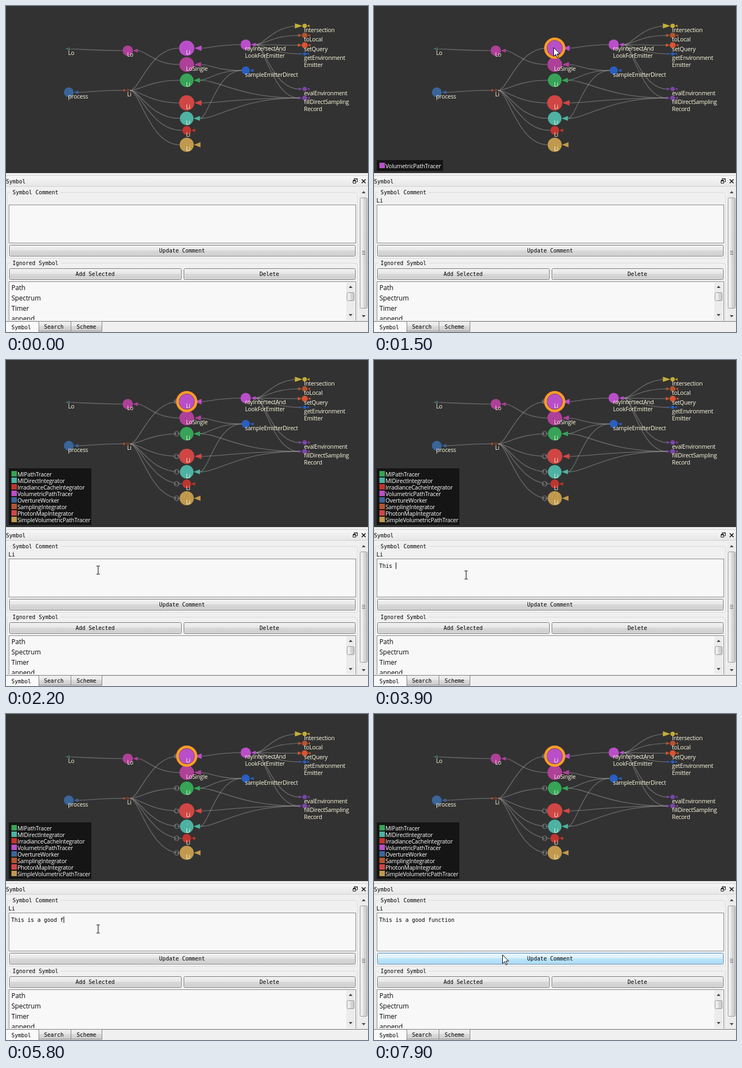
Animation, 666 px wide and 599 px high, one loop 8 s. Source, as an HTML page:

```html
<!DOCTYPE html>
<html lang="en">
<head>
<meta charset="utf-8">
<title>Symbol comment</title>
<style>
html, body { margin: 0; width: 100%; height: 100%; overflow: hidden; background: #f0f0f0; }
svg { display: block; width: 666px; height: 599px; }
text { white-space: pre; }
.tag { font: 10.6px "Open Sans", "Noto Sans", sans-serif; letter-spacing: -.22px; fill: #fffce0; }
.key { fill: #fff; }
.ui { font: 10px "DejaVu Sans Mono", "Liberation Mono", monospace; fill: #000; }
.item { font: 12px "Open Sans", "Noto Sans", sans-serif; fill: #000; }
.badge { font: bold 8px "DejaVu Sans", sans-serif; fill: #1c1c1c; text-anchor: middle; }
.mid { text-anchor: middle; }
</style>
</head>
<body>
<svg id="stage" viewBox="0 0 666 599" xmlns="http://www.w3.org/2000/svg">
  <defs>
    <linearGradient id="face" x2="0" y2="1">
      <stop offset="0" stop-color="#f2f2f2"/><stop offset=".48" stop-color="#e6e6e6"/>
      <stop offset=".5" stop-color="#d9d9d9"/><stop offset="1" stop-color="#cdcdcd"/>
    </linearGradient>
    <linearGradient id="hot" x2="0" y2="1">
      <stop offset="0" stop-color="#eaf6fd"/><stop offset=".48" stop-color="#d9f0fc"/>
      <stop offset=".5" stop-color="#bee6fd"/><stop offset="1" stop-color="#a7d9f5"/>
    </linearGradient>
    <linearGradient id="thumb">
      <stop offset="0" stop-color="#f3f3f3"/><stop offset=".48" stop-color="#e6e6e6"/>
      <stop offset=".52" stop-color="#d6d6d6"/><stop offset="1" stop-color="#c9c9c9"/>
    </linearGradient>
    <linearGradient id="title" x2="0" y2="1">
      <stop offset="0" stop-color="#f7f7f7"/><stop offset="1" stop-color="#e6e6e6"/>
    </linearGradient>
    <clipPath id="listClip"><rect x="6" y="507" width="637" height="70"/></clipPath>
  </defs>
</svg>
<script>
const svg = document.getElementById('stage');

function el(parent, name, attrs, content) {
  const e = document.createElementNS('http://www.w3.org/2000/svg', name);
  for (const k in attrs) e.setAttribute(k, attrs[k]);
  if (content !== undefined) e.textContent = content;
  parent.appendChild(e);
  return e;
}
const group = (parent = svg) => el(parent, 'g', {});
const rect = (p, x, y, width, height, fill, more) => el(p, 'rect', { x, y, width, height, fill, ...more });
const disc = (p, cx, cy, r, fill, more) => el(p, 'circle', { cx, cy, r, fill, ...more });
const text = (p, x, y, cls, s) => el(p, 'text', { x, y, class: cls }, s);
const path = (p, d, more) => el(p, 'path', { d, fill: 'none', ...more });
const show = (e, on) => e.setAttribute('visibility', on ? 'visible' : 'hidden');
const move = (e, x, y) => e.setAttribute('transform', `translate(${x} ${y})`);

const C = {
  green: '#36a457', teal: '#4eb2a2', red: '#c0352f', violet: '#b94fc8', blue: '#3a6599',
  rust: '#b3552f', coral: '#cf4645', gold: '#c0994d', pink: '#ae4098', azure: '#2a5ec0',
  yellow: '#c5ae36', orange: '#d95433', purple: '#7b46a6'
};

// ---- call graph, laid out in evenly spaced columns ----
const BACK = '#323232';
rect(svg, 0, 0, 666, 307, BACK);
const graph = group();
const [edges, badges, nodes, rings, labels] = Array.from({ length: 5 }, () => group(graph));

// id: column, y, radius, colour, label, badge
const N = {
  lo: [0, 79, 2, 'teal', 'Lo'],
  process: [0, 158.5, 9, 'blue', 'process'],
  lo2: [1, 82, 9.5, 'pink', 'Lo'],
  li: [1, 155, 2, 'rust', 'Li'],
  single: [2, 107.5, 13.5, 'pink', 'LoSingle'],
  volume: [2, 77.5, 14, 'violet', 'Li', 1],
  path: [2, 136.5, 12.5, 'green', 'Li', 3],
  photon: [2, 178, 14, 'coral', 'Li', 6],
  direct: [2, 206.5, 12.5, 'teal', 'Li', 4],
  cache: [2, 228.5, 8, 'red', 'Li', 5],
  simple: [2, 255, 13, 'gold', 'Li', 2],
  ray: [3, 71, 9.5, 'violet', 'rayIntersectAnd\nLookForEmitter'],
  sample: [3, 118.5, 7.5, 'azure', 'sampleEmitterDirect'],
  hit: [4, 36.5, 4, 'yellow', 'Intersection'],
  local: [4, 54, 5, 'rust', 'toLocal'],
  query: [4, 72, 5.5, 'orange', 'setQuery'],
  env: [4, 88, 3, 'azure', 'getEnvironment\nEmitter'],
  evalEnv: [4, 152.5, 4, 'purple', 'evalEnvironment'],
  fill: [4, 169, 4.5, 'purple', 'fillDirectSampling\nRecord']
};
const links = {
  lo: 'lo2', process: 'li', lo2: 'single', li: 'volume path photon direct cache simple',
  volume: 'ray', single: 'sample', path: 'sample fill', photon: 'fill', direct: 'sample fill',
  ray: 'hit local query env evalEnv fill'
};
const colX = c => 115.5 + 108.5 * c;

// Triangle with its tip at x, base at x + w
const arrow = (x, y, w, h, fill) => path(nodes, `M${x} ${y}l${w} ${-h}v${2 * h}z`, { fill });

for (const [id, [col, y, r, color, label, badge]] of Object.entries(N)) {
  const x = colX(col), fill = C[color];
  if (r < 3) disc(nodes, x, y, r, BACK, { stroke: fill });
  else {
    disc(nodes, x, y, r, fill);
    arrow(x + r, y, Math.max(5, r * .95), Math.max(2.3, r * .36), fill);
  }
  if (col === 4) {
    const big = id === 'hit' ? 2 : 1;
    arrow(x - r, y, -7 * big, r * .6 * big, fill);
  }
  if (id === 'li') arrow(x - 3, y, -5, 2.5, fill);
  if (badge) {
    disc(badges, 314, y, 5, '#6a6a6a');
    text(badges, 314, y + 3, 'badge', badge);
  }
  label.split('\n').forEach((s, i) => text(labels, x - 1.2, y + 11.3 + 13 * i, 'tag', s));
}
path(nodes, 'M110 78.5h3', { stroke: '#777' });

// Curves turn early: they leave the caller steeply and arrive flat
for (const from in links) for (const to of links[from].split(' ')) {
  const [c1, y1, r1] = N[from], [c2, y2, r2] = N[to];
  const x1 = colX(c1) + (r1 < 3 ? 4 : r1 * 1.95), x2 = colX(c2) - r2 - (r2 < 6 ? 6 : 0);
  const w = x2 - x1;
  path(edges, `M${x1} ${y1}C${x1 + w * .2} ${y1} ${x1 + w * .4} ${y2} ${x2} ${y2}`,
    { stroke: '#a0a0a0', 'stroke-opacity': .45, 'stroke-width': 1.6 });
}
const focus = { x: colX(N.volume[0]), y: N.volume[1] };
const ring = disc(rings, focus.x, focus.y, 17, 'none', { stroke: '#ff9b29', 'stroke-width': 5 });

// ---- legends ----
function legend(width, rows) {
  const g = group(), top = 295 - 12 * rows.length;
  rect(g, 5, top, width, 303 - top, '#151515');
  rows.forEach(([color, s], i) => {
    const y = top + 15 + 12 * i;
    rect(g, 10, y - 10, 10, 10, C[color]);
    text(g, 21, y, 'tag key', s);
  });
  return g;
}
const shortLegend = legend(122, [['violet', 'VolumetricPathTracer']]);
const fullLegend = legend(152, [
  ['green', 'MIPathTracer'], ['teal', 'MIDirectIntegrator'], ['red', 'IrradianceCacheIntegrator'],
  ['violet', 'VolumetricPathTracer'], ['blue', 'OvertureWorker'], ['rust', 'SamplingIntegrator'],
  ['coral', 'PhotonMapIntegrator'], ['gold', 'SimpleVolumetricPathTracer']
]);

// ---- dock panel ----
const ui = group();
rect(ui, 0, 307, 666, 292, '#f0f0f0');
rect(ui, 0, 311.5, 666, 20, 'url(#title)', { stroke: '#d0d0d0' });
text(ui, 0, 326, 'ui', 'Symbol');
path(ui, 'M640.5 320v-2h6v5h-2M640 317.5h7M638.5 320.5h5v5h-5zM638 321.5h6', { stroke: '#111' });
path(ui, 'M654.5 318.5l7 7m0-7l-7 7', { stroke: '#111', 'stroke-width': 1.7 });

function groupBox(y, h, label) {
  rect(ui, 2.5, y + .5, 644, h, 'none', { stroke: '#dadada', rx: 3 });
  rect(ui, 9, y - 4, 91, 9, '#f0f0f0');
  text(ui, 12, y + 4, 'ui', label);
}
groupBox(342, 121, 'Symbol Comment');
groupBox(472, 112, 'Ignored Symbol');
const picked = text(ui, 4.5, 361, 'ui', 'Li');

const box = { stroke: '#858585' };
rect(ui, 5.5, 365.5, 638, 70, '#f8f8f8', box);
rect(ui, 5.5, 506.5, 638, 80, '#f8f8f8', box);

function button(x, y, w, label) {
  const face = rect(ui, x + .5, y + .5, w - 1, 20, 'url(#face)', { stroke: '#707070', rx: 2 });
  rect(ui, x + 1.5, y + 1.5, w - 3, 18, 'none', { stroke: '#fff', 'stroke-opacity': .6, rx: 1 });
  text(ui, x + w / 2 - .5, y + 14, 'ui mid', label);
  return face;
}
const update = button(6, 439, 637, 'Update Comment');
button(6, 482, 317, 'Add Selected');
button(327, 482, 316, 'Delete');

const list = el(ui, 'g', { 'clip-path': 'url(#listClip)' });
['Path', 'Spectrum', 'Timer', 'append'].forEach((s, i) => text(list, 10, 522 + 19 * i, 'item', s));

function scrollbar(x, y1, y2, top, bottom) {
  rect(ui, x, y1, 16, y2 - y1, '#ececec');
  rect(ui, x + 1.5, top + .5, 13, bottom - top - 1, 'url(#thumb)', { stroke: '#979797', rx: 2 });
  path(ui, `M${x + 4.5} ${y1 + 10}l3.5-4 3.5 4z`, { fill: '#444' });
  path(ui, `M${x + 4.5} ${y2 - 11}l3.5 4 3.5-4z`, { fill: '#444' });
  const mid = (top + bottom) / 2;
  if (bottom - top > 50)
    for (let d = -3; d <= 3; d += 3) path(ui, `M${x + 5} ${mid + d - .5}h6`, { stroke: '#6c6c6c' });
}
scrollbar(626, 508, 577, 526, 542);
scrollbar(650, 334, 579, 352, 556);

rect(ui, 0, 578, 666, 21, '#f0f0f0');
path(ui, 'M0 579.5H666', { stroke: '#6c6c6c' });
const tabEdge = { stroke: '#808080' };
rect(ui, 60.5, 579.5, 59, 18, 'url(#face)', tabEdge);
rect(ui, 119.5, 579.5, 57, 18, 'url(#face)', tabEdge);
rect(ui, 0, 580, 60, 19, '#fafafa');
path(ui, 'M60.5 579v20', tabEdge);
['Symbol', 'Search', 'Scheme'].forEach((s, i) => text(ui, 10 + 60 * i, i ? 593 : 594, 'ui', s));

// ---- typed comment, caret, pointers ----
const note = 'This is a good function';
const typed = text(svg, 9.5, 382, 'ui', '');
const caret = rect(svg, 0, 372, 1, 12, '#000');
const pointer = path(svg, 'M.5 .5v16l3.7-3.6 2.6 6 2.4-1-2.6-5.9h5.2z', { fill: '#fff', stroke: '#000' });
const beam = path(svg, 'M-3 -7.5h2.5l.5 .5 .5-.5h2.5M0 -7v14M-3 7.5h2.5l.5-.5 .5 .5h2.5', { stroke: '#000' });

// Typing pace: time, letters so far
const pace = [
  [3099, 0], [3100, 1], [3500, 1], [3600, 2], [3900, 5], [4600, 9], [5200, 12],
  [5600, 15], [5900, 17], [6200, 19], [6400, 19], [6500, 20], [6800, 23]
];
// Pointer: time, x, y
const mouse = [
  [299, -40, -40], [300, 597, 30], [600, 394, 83], [800, 342, 80], [1000, 330, 76], [1900, 330, 76],
  [2000, 312, 112], [2200, 169, 386], [2300, 169, 395], [7500, 169, 395], [7600, 192, 427], [7900, 236, 442]
];

function lerp(keys, t) {
  const i = keys.findIndex(k => k[0] > t);
  if (i < 1) return keys.at(i).slice(1);
  const a = keys[i - 1], b = keys[i], p = (t - a[0]) / (b[0] - a[0]);
  return a.slice(1).map((v, j) => v + (b[j + 1] - v) * p);
}
const letters = t => Math.floor(lerp(pace, t)[0] + 1e-6);

const FRAME = 100, CLICK = 2500, BLINK = 487;

// The caret blinks from the click on; a keystroke lights it until the next blink
function caretOn(t) {
  const beat = Math.floor((t - CLICK) / BLINK);
  return beat >= 0 && (beat % 2 === 0 || letters(t) > letters(CLICK + beat * BLINK));
}

function draw(time) {
  const t = Math.floor(time / FRAME) * FRAME;
  const count = letters(t), shown = note.slice(0, count);
  if (typed.textContent !== shown) typed.textContent = shown;
  caret.setAttribute('x', 10 + 6 * count);
  show(caret, caretOn(t));

  const [x, y] = lerp(mouse, t).map(Math.round);
  const inField = y > 365 && y < 436, onButton = y >= 439;
  move(pointer, x, y);
  move(beam, x + .5, y);
  show(pointer, !inField);
  show(beam, inField);
  update.setAttribute('fill', onButton ? 'url(#hot)' : 'url(#face)');
  update.setAttribute('stroke', onButton ? '#3c7fb1' : '#707070');

  show(ring, t >= 1500 || Math.hypot(x - focus.x, y - focus.y) < 14);
  show(picked, t >= 1500);
  show(shortLegend, t >= 1500 && t < 1700);
  show(fullLegend, t >= 1700);
  show(badges, t >= 1700);
  move(graph, 0, t >= 2100 && t < 4900 ? -1 : 0);
}

const start = performance.now();
function tick(now) {
  draw(Math.max(0, now - start) % 8000);
  requestAnimationFrame(tick);
}
draw(0);
requestAnimationFrame(tick);
</script>
</body>
</html>
```
